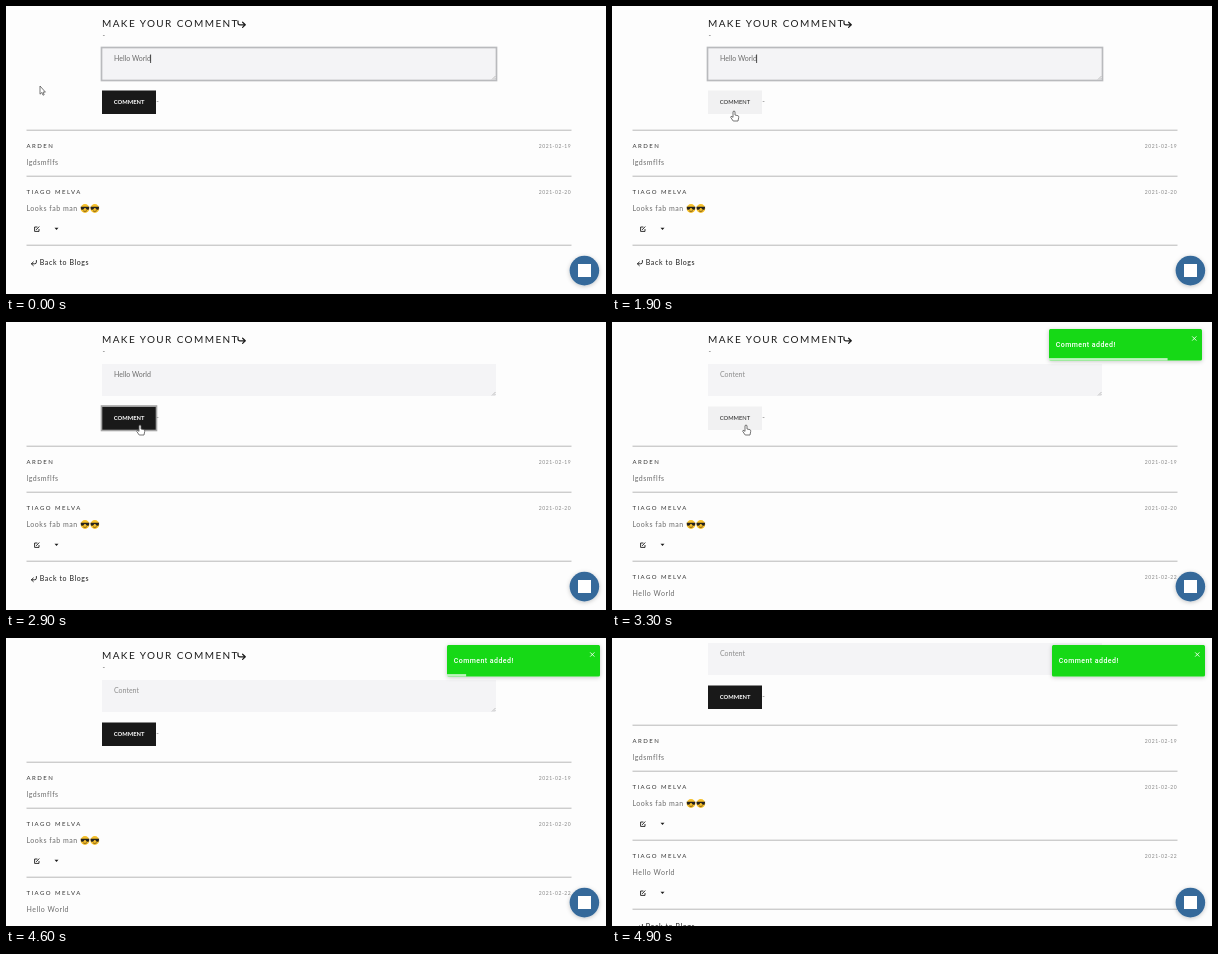
An HTML page that plays this animation: 600x288 px, repeating every 5000 ms.

```html
<!DOCTYPE html>
<html lang="en">
<head>
<meta charset="utf-8">
<title>Comment form</title>
<style>
  html, body { margin: 0; width: 100%; height: 100%; overflow: hidden; background: #fdfdfd; }
  svg { display: block; width: 600px; height: 288px; }
  text { font-family: Lato, "Open Sans", sans-serif; white-space: pre; }
  .title { font-size: 10px; letter-spacing: 1.4px; fill: #1c1c1c; }
  .field { font-size: 7px; }
  .name { font-size: 6px; letter-spacing: 1.45px; fill: #333; }
  .body { font-size: 7px; letter-spacing: .52px; fill: #6c6c6c; }
  .date { font-size: 5px; letter-spacing: .55px; fill: #888; }
  .back { font-size: 7px; letter-spacing: .6px; fill: #1c1c1c; }
  .button { font-size: 5.8px; }
  .toast { font: 500 7px Roboto, sans-serif; letter-spacing: .45px; fill: #fff; }
  .line { fill: none; stroke: #1c1c1c; stroke-linecap: round; stroke-linejoin: round; }
</style>
</head>
<body>
<svg viewBox="0 0 600 288" xmlns="http://www.w3.org/2000/svg">
  <defs>
    <filter id="shadow" x="-30%" y="-30%" width="160%" height="180%">
      <feDropShadow dx="0" dy="1" stdDeviation="2" flood-opacity=".22"/>
    </filter>
    <g id="cool">
      <circle r="4.4" fill="#f5c02c"/>
      <path d="M-4.4-1.8H4.4L3.8 1Q2 2.2.5-.5H-.5Q-2 2.2-3.8 1Z" fill="#25221f"/>
      <path d="M-1.8 2.4Q0 3.6 2 2.2" fill="none" stroke="#6b4a12" stroke-width=".8"/>
    </g>
    <g id="actions">
      <path class="line" d="M31-2H28.6V2.4H33V.4M30.4.6L33-2.2" stroke-width=".9"/>
      <path d="M48.5-1.2H52.5L50.5 1Z" fill="#1c1c1c"/>
    </g>
  </defs>

  <g id="page">
    <text class="title" x="96" y="21">MAKE YOUR COMMENT</text>
    <path class="line" d="M232 15V17Q232 18.8 234 18.8H239M236.6 16.2L239.3 18.8L236.6 21.4" stroke-width="1.2"/>
    <text class="field" x="96.5" y="32" fill="#666">-</text>

    <rect x="96" y="42" width="394" height="32" fill="#f4f4f6"/>
    <path d="M486 73.5L489.5 70M488 73.5L489.5 72" stroke="#999" stroke-width=".6"/>
    <rect id="fieldRing" x="95.5" y="41.5" width="395" height="33" fill="none" stroke="#b9babd" stroke-width="1.7"/>
    <text id="fieldText" class="field" x="108" y="55.3"></text>
    <path id="caret" d="M144.6 48.5V57" stroke="#222" stroke-width=".8"/>

    <rect id="button" x="96" y="84.5" width="54" height="23.5"/>
    <rect id="buttonRing" x="95.5" y="84" width="55" height="24.5" fill="none" stroke="#a5a5a5" stroke-width="1.6"/>
    <text id="buttonText" class="button" x="107.8" y="98.3">COMMENT</text>
    <text class="field" x="150.3" y="98" fill="#777">-</text>

    <g id="comments"></g>
    <g id="back">
      <path d="M20.5 239.2H565.5" stroke="#b9b9b9"/>
      <path class="line" d="M30.4 254.5V256.2Q30.4 257.8 28.8 257.8H25.5M27.3 256L25.4 257.8L27.3 259.6" stroke-width=".9"/>
      <text class="back" x="33.8" y="259">Back to Blogs</text>
    </g>
  </g>

  <g filter="url(#shadow)"><circle cx="578.4" cy="264.6" r="14.8" fill="#35699a"/></g>
  <rect x="572" y="258" width="13" height="13" fill="#fff"/>

  <g id="toast">
    <rect x="441" y="7" width="153" height="31.4" rx="1.5" fill="#12d912" filter="url(#shadow)"/>
    <rect id="progress" x="441" y="36.1" height="2.3" fill="#fff" fill-opacity=".72"/>
    <text class="toast" x="447.7" y="25.3">Comment added!</text>
    <path d="M584.2 14.4L588.4 18.6M588.4 14.4L584.2 18.6" stroke="#fff" stroke-opacity=".85"/>
  </g>

  <path id="cursor" stroke="#555" stroke-width=".8" stroke-linejoin="round" fill="#fff"/>
</svg>

<script>
const LOOP = 5000, STEP = 100;
const CLICK = 2600, SUBMIT = 3000, TOAST_IN = 3200;
const ARROW = "M0 0V8.2L1.8 6.5L3 9.2L4.2 8.7L3 6.1H5.4Z";
const HAND = "M-1 .6Q0-.6 1 .6V4L4 4.7Q5 5 4.7 6.5L4 10H-.8L-3.3 6.3Q-3.4 5-2 5.5L-1 6.4Z";

const cursorX = [[0, 34], [500, 152], [800, 165], [1200, 168], [1500, 79], [1800, 108],
  [1900, 122], [2400, 134], [3600, 134], [3700, 130], [3900, 95], [4300, 130], [4500, 150]];
const cursorY = [[0, 80], [500, 79], [800, 90], [1200, 95], [1500, 113], [1800, 111],
  [1900, 105], [2400, 103], [3600, 103], [3700, 105], [3900, 171], [4300, 250], [4500, 300]];
const toastX = [[3200, 40], [3300, -4], [3400, 2], [3500, -1], [3600, 0], [4800, 0], [4900, -1]];
const scrollY = [[4600, 0], [4900, 37]];

const el = Object.fromEntries([...document.querySelectorAll("[id]")].map(e => [e.id, e]));
const show = (node, on) => node.setAttribute("visibility", on ? "visible" : "hidden");
const move = (node, x, y) => node.setAttribute("transform", `translate(${x} ${y})`);
const set = (node, attrs) => Object.entries(attrs).forEach(([k, v]) => node.setAttribute(k, v));

function track(keys, t) {
  const i = keys.findIndex(k => k[0] >= t);
  if (i < 0) return keys[keys.length - 1][1];
  if (i === 0) return keys[0][1];
  const [t0, a] = keys[i - 1], [t1, b] = keys[i];
  const p = (t - t0) / (t1 - t0);
  return a + (b - a) * p * p * (3 - 2 * p);
}

function comment(y, name, body, date, extra = "") {
  return `<g transform="translate(0 ${y})">
    <path d="M20.5 .2H565.5" stroke="#b9b9b9"/>
    <text class="name" x="20.5" y="18.2">${name}</text>
    <text class="date" x="532.8" y="18">${date}</text>
    <text class="body" x="20.5" y="35">${body}</text>${extra}</g>`;
}

const actions = '<use href="#actions" y="53"/>';
const faces = '<use href="#cool" x="79" y="32.5"/><use href="#cool" x="88.8" y="32.5"/>';
el.comments.innerHTML =
  comment(124, "ARDEN", "lgdsmflfs", "2021-02-19") +
  comment(170, "TIAGO MELVA", "Looks fab man", "2021-02-20", faces + actions) +
  `<g id="added">${comment(239, "TIAGO MELVA", "Hello World", "2021-02-22", actions)}</g>`;
el.added = document.getElementById("added");

function render(t) {
  const x = track(cursorX, t), y = track(cursorY, t);
  const hover = x > 96 && x < 150 && y > 84 && y < 108;
  const typing = t < CLICK, sent = t >= SUBMIT;
  const focused = !typing && !sent;
  const light = hover && !focused;

  show(el.fieldRing, typing);
  show(el.caret, typing && (t + 400) % 1060 < 530);
  el.fieldText.textContent = sent ? "Content" : "Hello World";
  set(el.fieldText, { fill: sent ? "#8c8c8c" : "#6c6c6c" });

  show(el.buttonRing, focused);
  set(el.button, { fill: light ? "#f1f1f2" : "#191919" });
  set(el.buttonText, { fill: light ? "#222" : "#fff", "font-weight": light ? 400 : 700 });

  show(el.added, sent);
  move(el.back, 0, sent ? 69 : 0);
  move(el.page, 0, -track(scrollY, t));

  show(el.toast, t >= TOAST_IN);
  move(el.toast, track(toastX, t), 0);
  set(el.progress, { width: 153 * Math.max(0, Math.min(1, (4850 - t) / 2000)) });

  set(el.cursor, { d: hover ? HAND : ARROW });
  move(el.cursor, x, y);
  show(el.cursor, t < 4500);
}

const start = performance.now();
function tick() {
  const t = (performance.now() - start) % LOOP;
  render(Math.floor(t / STEP) * STEP);
  requestAnimationFrame(tick);
}
tick();
</script>
</body>
</html>
```
